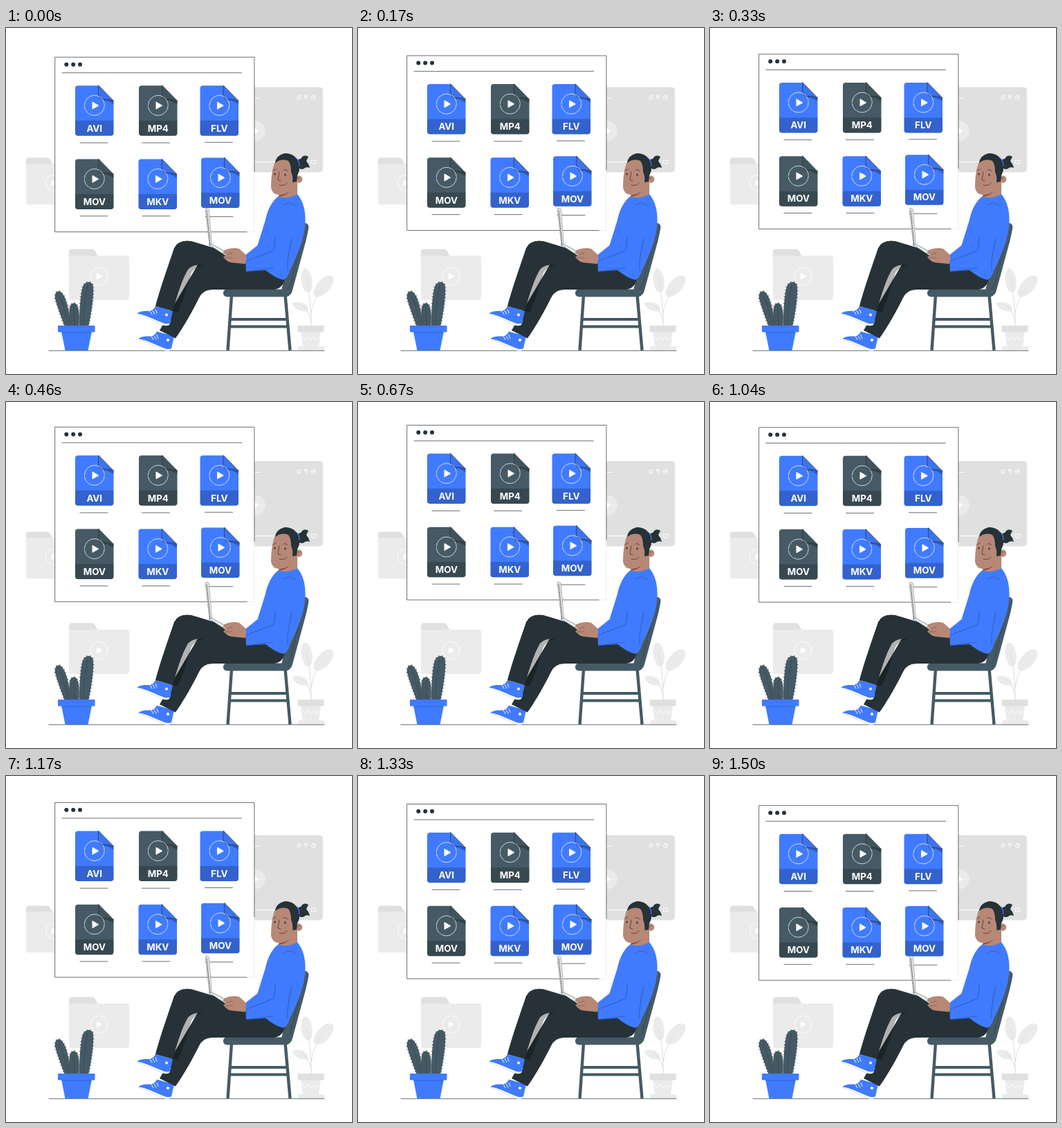
These frames come from a looping animation (500 by 500 pixels, 1540 ms). An HTML page:

```html
<!DOCTYPE html>
<html lang="en">
<head>
<meta charset="utf-8">
<title>Video files</title>
<style>
html, body { margin: 0; width: 100%; height: 100%; overflow: hidden; background: #fff; }
svg { display: block; width: 100vw; height: 100vh; }
text { font: 700 13.4px Inter, Roboto, sans-serif; fill: #fff; text-anchor: middle; }
.line { fill: none; stroke: #263238; stroke-width: .7; stroke-linecap: round; stroke-linejoin: round; }
.white { fill: none; stroke: #fff; stroke-width: 1; stroke-linecap: round; stroke-linejoin: round; }
.seam { stroke: #2450a8; }
.crease { stroke: #7d5548; }
.blue { fill: #407bff; }
.dark { fill: #263238; }
.slate { fill: #455a64; }
.skin { fill: #b78876; }
.pale { fill: #ebebeb; }
.grey { fill: #e0e0e0; }
.spines { fill: none; stroke: #37474f; stroke-width: 2.600; stroke-dasharray: .8 4; }
</style>
</head>
<body>
<svg viewBox="0 0 500 500" xmlns="http://www.w3.org/2000/svg">
  <defs>
    <g id="folder">
      <path class="grey" d="M0 12V4q0-4 4-4H33q3 0 5 3l3 6v5H0z"/>
      <rect class="pale" y="9.5" width="87" height="64" rx="4"/>
      <circle class="white" cx="43.5" cy="39.5" r="12.5"/>
      <path d="M40 34.5v10l8.500-5z" fill="#fff"/>
    </g>
    <g id="shoe">
      <path d="M-1 9.500L0 12.500C12 15 24 23 36 27.500q7 1.500 9-1L47 20z" fill="#fff" stroke="#c5cbd0" stroke-width=".6"/>
      <path class="blue" d="M25 0L50 7 46 24.500C43 26 39 25.500 36 24.500 24 20 13 14 -1 11 0 7.500 8 6.500 15 7 20 7 23 4 25 0z"/>
      <path class="white" d="M17 7l3 5M21 6.500l3 5M25 5l2 5M1 11.500C13 14 25 21 36 25"/>
      <circle cx="41" cy="12.500" r="2" fill="#fff"/>
    </g>
  </defs>

  <!-- background -->
  <rect class="grey" x="340" y="85.500" width="118" height="123" rx="5"/>
  <circle class="pale" cx="360" cy="149" r="14.500"/>
  <path d="M356.500 143.500v11l9-5.500z" fill="#fff"/>
  <path class="white" d="M350 101.500H368M350 193.500H437M442 191h5.500v5h-5.500z"/>
  <path class="white" d="M421 102v-3l4-2v5zM431 98h5l-2.500 3.500zM433.500 101v2"/>
  <circle class="white" cx="444.500" cy="100.500" r="3"/>
  <path class="white" d="M444.500 99v1.500h1.500"/>
  <use href="#folder" transform="translate(29 187.500) scale(.92)"/>
  <use href="#folder" x="91" y="319.500"/>

  <!-- pale plant -->
  <g class="pale">
    <ellipse cx="434.500" cy="365" rx="8" ry="17.500" transform="rotate(-8 434.500 365)"/>
    <ellipse cx="459" cy="373" rx="9.500" ry="19" transform="rotate(42 459 373)"/>
    <path d="M413 397C423 394 436 396 437 409 428 411 418 408 413 397z"/>
    <path d="M426 437h29l-3 25h-23z"/>
    <rect x="422" y="460" width="38" height="6" rx="2"/>
    <path d="M441 431C441 407 439 382 434 362M441 414C443 397 449 384 459 373M441 426Q439 408 426 400" fill="none" stroke="#dedede"/>
  </g>
  <rect class="grey" x="421.500" y="430" width="38" height="9.500" rx="1"/>
  <path class="white" d="M429 446l4 5 4-5 4 5 4-5 4 5 4-5"/>

  <!-- browser window -->
  <g id="panel">
    <rect x="70.700" y="42.700" width="288.200" height="252.500" fill="#fff"/>
    <path d="M358.900 208V295.200H348" fill="none" stroke="#e6e6e6" stroke-width=".7"/>
    <path class="line" d="M358.900 208V42.700H70.700V295.200H348M81 65.300H340.500"/>
    <g class="dark"><circle cx="87.300" cy="53.200" r="3"/><circle cx="97.200" cy="53.200" r="3"/><circle cx="107" cy="53.200" r="3"/></g>
  </g>

  <path class="line" d="M62 466.300H460"/>

  <!-- cactus -->
  <g id="cactus">
    <path d="M85 432C80 418 74 403 71 391 69.500 381 76 378 80 382 88 389 93 416 94 432z"/>
    <path d="M94 432C92 421 91 409 92.500 402 95 396 101 396 103.500 402 106 410 106 422 105 432z"/>
    <path d="M106 432C106 412 107 391 110 377 112 366 122 364 125.500 371 128 383 123 415 119 432z"/>
  </g>
  <path class="line" d="M77 386Q85 405 90 430M98 402Q98 416 99 430M118 372Q112 400 112 430" opacity=".5"/>
  <path class="blue" d="M79.500 436H124.500L118.500 466H85.500z"/>
  <path d="M80.500 439.500H124v1.500H81z" opacity=".15"/>
  <rect class="blue" x="75" y="430" width="53.500" height="9.500" rx=".7"/>

  <!-- chair -->
  <g fill="none" stroke="#455a64" stroke-width="4.400">
    <path d="M326 386L320.500 466M403.500 386L410.500 466"/>
    <path d="M325 421H407M324 431.500H408" stroke-width="3.800"/>
  </g>
  <path class="slate" d="M424 283Q434 279 437.500 286 437 293 433 309L414 379Q412 388 403 388H396L402 362z"/>
  <path class="line" d="M431 290L411 371Q408 379 400 379" opacity=".6"/>
  <rect class="slate" x="314" y="377.500" width="96" height="11" rx="5"/>

  <!-- legs and shoes -->
  <use href="#shoe" x="193" y="438.500"/>
  <path class="dark" d="M240 405L222 437 245 448.500C253 437 264 420 279 390Q284 378.500 298 378H388Q403 375 403 358L350 340 290 320z"/>
  <use href="#shoe" x="191" y="402"/>
  <path class="dark" d="M216 402C224 372 236 339 243 318Q249 305 268 308L318 323 350 340V350L286 342Q270 341 263 349C253 366 247 389 241 409z"/>
  <path d="M241 409C247 389 253 366 263 349Q270 341 286 342 273 345 268 354C262 370 258 391 248 411z" fill="#000" opacity=".3"/>

  <!-- torso -->
  <path class="blue" d="M395 242C385 249 378 262 375 277L363.500 314 346 328 347 352 375 350Q390 362 401 364 408 360 410 351C423 325 432.500 300 432.500 280 433 262 429 250 421 240z"/>
  <path class="line seam" d="M389 302Q389 316 386 322L347 337M348 352L386 347M407 350C406 334 410 319 413 304M402 256Q410 249 418 257"/>

  <!-- laptop and hand -->
  <path class="grey" d="M288 262q0-2 2-2 3 0 3.500 3L297.500 313 294 315z" stroke="#78878e" stroke-width=".5"/>
  <path class="line" d="M290 264L295 313" stroke-dasharray="2 1.500"/>
  <path d="M293 313L297 312.500 323 326 319 330z" fill="#eee" stroke="#455a64" stroke-width=".6"/>
  <path class="skin" d="M347 328L337 319Q327 316 316 321L313 325 319 328 314 331Q319 338 326 339L346 341z"/>
  <path class="line crease" d="M318 328L327 325M317 332L327 332"/>

  <!-- head -->
  <path class="skin" d="M395 232L394 243Q405 249 421 240L421 216z"/>
  <path d="M395 240.500Q404 241 409 236 405 243 394.500 243.500z" fill="#8f4f3c"/>
  <path class="skin" d="M389 193C384 204 383 219 383 231Q385 242 397 241 411 239 415 225L420 205 409 187 393 187z"/>
  <circle class="skin" cx="423" cy="218.500" r="5.300"/>
  <path class="line crease" d="M420 219q2-4 5-2"/>
  <g class="dark">
    <path d="M389 195Q390 184 403 181 419 181 424 197 425 206 421 213L420 222 414 223Q415 214 412 208 412 197 408 192 398 188 389 195z"/>
    <path d="M421 195Q421 189 426 189 430 182 437 186 435 190 434 192 438 197 439 202 433 200 431 203 425 206 422 200z"/>
    <ellipse cx="388.500" cy="211" rx="1.200" ry="1.600"/>
    <ellipse cx="403.500" cy="212" rx="1.200" ry="1.600"/>
  </g>
  <path d="M419.500 188Q424 192 424 200" fill="none" stroke="#407bff" stroke-width="1.200"/>
  <path class="line" d="M386 206l4-2M401 205q4-1 6 2M395 208L393 220l4 1M395 227Q402 229 406 224"/>
</svg>
<script>
const BLUE = "#407bff", SLATE = "#455a64";
const panel = document.getElementById("panel");

function add(parent, tag, attrs, text) {
  const el = document.createElementNS("http://www.w3.org/2000/svg", tag);
  for (const key in attrs) el.setAttribute(key, attrs[key]);
  if (text) el.textContent = text;
  parent.append(el);
  return el;
}

// one file icon, with its caption line centred on lineX
function file(label, x, y, color, lineX, lineY) {
  const g = add(panel, "g", { transform: `translate(${x} ${y})` });
  const flap = "M34 0Q32.500 9 34 15 35 19 39 19.500 47 19 55.500 22";
  add(g, "path", { d: "M4 0H34L55.500 22V68.500q0 4-4 4H4q-4 0-4-4V4q0-4 4-4z", fill: color });
  add(g, "path", { d: "M0 50.500H55.500V68.500q0 4-4 4H4q-4 0-4-4z", opacity: .2 });
  add(g, "path", { d: "M34 15Q35 19 39 19.500 47 19 55.500 22V27L46 22 38 21z", opacity: .25 });
  add(g, "path", { d: flap + "z", opacity: .06 });
  add(g, "path", { class: "line", d: flap + "L34 0" });
  add(g, "circle", { class: "white", cx: 27.8, cy: 28.6, r: 14.5, style: "stroke-width:.75", "stroke-dasharray": "30 1.5 12 2" });
  add(g, "path", { d: "M24.500 24v9.500q0 1 1 .5l8-4.500q1-.7 0-1.300l-8-4.700q-1-.5-1 .5z", fill: "#fff" });
  add(g, "text", { x: 27.8, y: 66.3 }, label);
  add(panel, "path", { class: "line", d: `M${lineX - 20} ${lineY}h40` });
}

file("AVI", 100, 83.8, BLUE, 127, 166.5);
file("MP4", 192, 83.8, SLATE, 216.5, 166.5);
file("FLV", 280.5, 83.8, BLUE, 307.5, 165.8);
file("MOV", 100, 190, SLATE, 127, 272.3);
file("MKV", 191.5, 190, BLUE, 217, 272.3);
file("MOV", 282, 188, BLUE, 308, 273.2);

// stems with short spines along their edges
for (const stem of document.querySelectorAll("#cactus path")) {
  stem.setAttribute("class", "slate");
  add(stem.parentNode, "path", { class: "spines", d: stem.getAttribute("d") });
}

const LOOP = 1540, STEPS = 37;

function draw(ms) {
  const step = Math.min(STEPS - 1, Math.floor((ms % LOOP + 5) * .024));
  const phase = (step + 1) / STEPS % 1;
  const lift = 10 * (1 - Math.abs(2 * phase - 1));
  panel.setAttribute("transform", `translate(0 ${-lift})`);
}

const start = performance.now();
function tick() {
  draw(performance.now() - start);
  requestAnimationFrame(tick);
}
tick();
</script>
</body>
</html>
```
